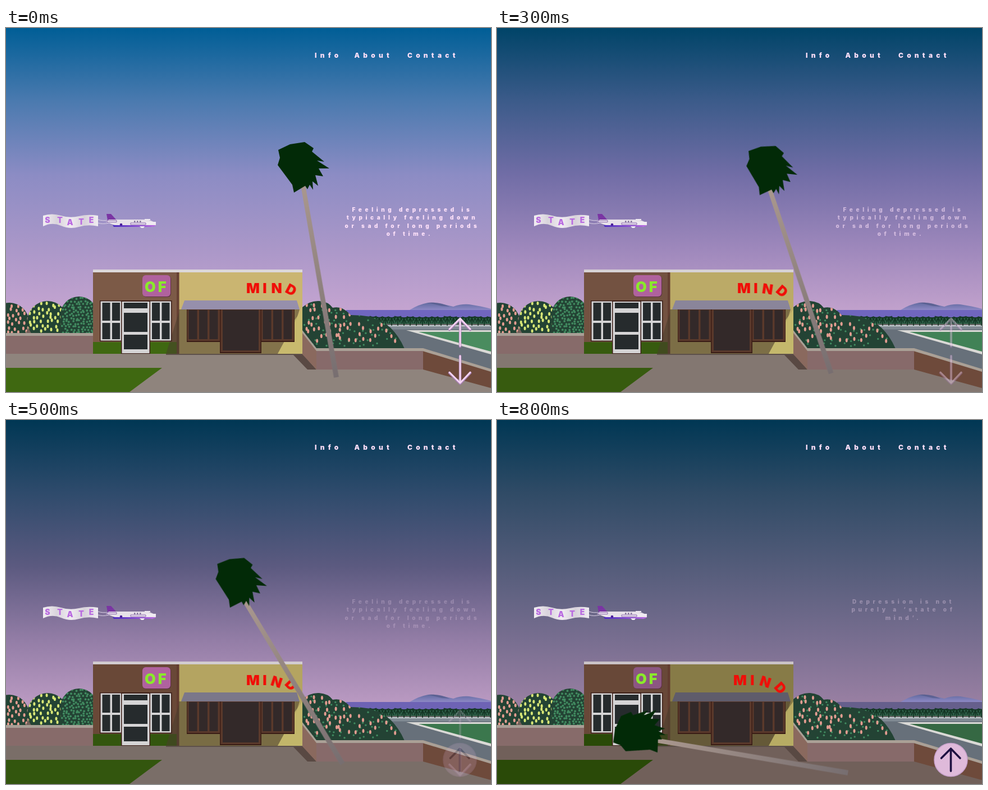
Animation, 864 px wide and 648 px high, one loop 0.9 s. Source, as an HTML page:

```html
<!DOCTYPE html>
<html lang="en">
<head>
<meta charset="utf-8">
<title>State of Mind</title>
<style>
  html, body { margin: 0; width: 100%; height: 100%; overflow: hidden; background: #71605a; }
  svg { display: block; width: 864px; height: 648px; }
  text { font-family: Inter, "Open Sans", sans-serif; font-weight: 900; }
  .nav { font-size: 12px; letter-spacing: 6.2px; fill: #fbdff8; }
  .copy { font-size: 10px; letter-spacing: 5.6px; fill: #fbdff8; text-anchor: middle; }
  .mind { font-size: 25px; fill: #f00e08; text-anchor: middle; }
  .banner { font-size: 14px; fill: #b96be0; text-anchor: middle; }
  .line { fill: none; stroke-linecap: round; stroke-linejoin: round; }
  #notice2, #button { opacity: 0; }
</style>
</head>
<body>
<svg viewBox="0 0 864 648">
  <defs>
    <linearGradient id="skyFill" x1="0" y1="0" x2="0" y2="1">
      <stop class="sky" offset="0"/><stop class="sky" offset=".255"/><stop class="sky" offset=".51"/>
      <stop class="sky" offset=".765"/><stop class="sky" offset=".98"/>
    </linearGradient>
    <linearGradient id="hill" x1="0" y1="0" x2="0" y2="1">
      <stop stop-color="#626b9f"/><stop offset="1" stop-color="#8d88c5"/>
    </linearGradient>
    <linearGradient id="cloth">
      <stop stop-color="#f2eef3"/><stop offset=".25" stop-color="#d9d4dc"/><stop offset=".5" stop-color="#f0ebf1"/>
      <stop offset=".75" stop-color="#d8d2db"/><stop offset="1" stop-color="#f0ecf2"/>
    </linearGradient>
    <linearGradient id="belly"><stop stop-color="#4a2bc0"/><stop offset="1" stop-color="#b96be0"/></linearGradient>
    <linearGradient id="bark" x1="0" y1="0" x2="0" y2="1">
      <stop stop-color="#a9978e"/><stop offset="1" stop-color="#776e70"/>
    </linearGradient>
    <clipPath id="pinkBush"><circle cx="6" cy="524" r="35"/></clipPath>
    <clipPath id="limeBush"><circle cx="74" cy="522" r="36"/></clipPath>
    <clipPath id="greenBush"><circle cx="130" cy="511" r="33"/><path d="M98 511h58v34h-58z"/></clipPath>
    <clipPath id="bigBush"><path d="M528 497Q542 485 558 486 574 487 582 498 600 494 614 511 632 511 650 514 690 525 710 571H553L528 541Z"/></clipPath>
  </defs>

  <rect width="864" height="512" fill="url(#skyFill)"/>

  <!-- coast -->
  <rect id="sea" x="606" y="502" width="258" height="14"/>
  <path d="M719 502Q735 492 752 489 768 488 780 492L797 496Q810 491 825 492 846 495 864 500V502Z" fill="url(#hill)"/>
  <path d="M752 489Q772 487 790 496L776 495Z" fill="#515886" opacity=".6"/>
  <rect x="606" y="528" width="258" height="120" fill="#67707a"/>
  <rect x="640" y="529" width="224" height="2.5" fill="#c5cbcd"/>
  <rect x="640" y="531.5" width="224" height="5" fill="#808a93"/>
  <g id="palmRow"></g>
  <path d="M713 538H864V581Z" fill="#dad9d6"/>
  <path id="field" d="M735 541H864V576Z"/>

  <!-- ground and walls -->
  <path id="ground" d="M0 580H553L743 606 864 640V648H0Z"/>
  <path id="grass" d="M0 605H278L220 648H0Z"/>
  <g clip-path="url(#pinkBush)"><path d="M0 480h50v70H0z" fill="#234334"/><g id="pinkDots"></g></g>
  <g clip-path="url(#limeBush)"><path d="M30 480h90v70H30z" fill="#234334"/><g id="limeDots"></g></g>
  <g clip-path="url(#greenBush)"><path d="M90 470h70v80H90z" fill="#234334"/><g id="greenDots"></g></g>
  <rect y="543" width="156" height="37" fill="#876b6a"/>
  <rect y="543" width="156" height="5" fill="#a99f96"/>
  <g clip-path="url(#bigBush)"><path d="M520 480h200v100H520z" fill="#234334"/><g id="mixedDots"></g></g>
  <path d="M510 580H528L553 608H537Z" fill="#594943"/>
  <path d="M528 540L553 572V608L528 581Z" fill="#8a695e"/>
  <path d="M553 573H743V608H553Z" fill="#876a6a"/>
  <path d="M743 573L864 611V641L743 608Z" fill="#6e4a3b"/>
  <path d="M528 538L553 570H743L864 607V612L742 575H553L528 543Z" fill="#aaa096"/>

  <!-- shop -->
  <path id="brown" d="M155 435H309V580H155Z"/>
  <path d="M304 435h5v145h-5z" fill="#60392e" opacity=".75"/>
  <path id="hedge" d="M155 559h149v21H155z"/>
  <path id="tan" d="M308.500 435H528V580H308.500Z"/>
  <path d="M308 506V501H523L518 517 484 580H285Z" fill="#4a3e2c" opacity=".55"/>
  <path d="M514 520V558H496L484 580H528V501Z" fill="#c7bd6e" opacity=".75"/>
  <path id="roof" d="M155 430H528V435H155Z"/>
  <path d="M285 580H528V582H285Z" fill="#5d504a"/>
  <g id="windows"></g>
  <path id="awning" d="M318 485H518L523 501H312Z"/>
  <rect x="244" y="441" width="50" height="38" rx="6" fill="#5c3144"/>
  <rect id="sign" x="243" y="440" width="50" height="38" rx="6"/>
  <text x="247" y="469.500" font-size="25.500" letter-spacing="4" fill="#8aea2a">OF</text>
  <g class="mind">
    <text class="letter" y="9">M</text><text class="letter" y="9">I</text>
    <text class="letter" y="9">N</text><text class="letter" y="9">D</text>
  </g>

  <!-- plane with banner -->
  <path d="M164 341Q172 344 183 342M164 347Q172 350 183 347" fill="none" stroke="#ddd3e6"/>
  <path d="M66 334Q82 329 98 334T130 335 164 334V353Q146 349 130 354T98 352 66 353Z" fill="url(#cloth)"/>
  <g class="banner">
    <text x="74" y="347">S</text><text x="96" y="347">T</text><text x="114" y="351">A</text>
    <text x="134" y="350">T</text><text x="152" y="347">E</text>
  </g>
  <path d="M179 331H187L197 342H181Z" fill="#7a35a3"/>
  <path d="M178 345L183 341H245Q259 341 267 348V351L260 354H203L191 350Z" fill="#e7e1e9"/>
  <path d="M190 351H267Q265 354 258 354H192Z" fill="url(#belly)"/>
  <path d="M247 340h10v2h-10zM238 353h9l-2 3h-4zM248 345h19v5h-19z" fill="#f0ebf2"/>
  <path d="M180 342.500h17v3h-17zM222 347h27v3h-27z" fill="#eee8f1" stroke="#71499c" stroke-width=".8"/>
  <path d="M228 344.500h14" stroke="#7b6a95" stroke-width="2.500" stroke-dasharray="2.500 2.500"/>
  <circle cx="205" cy="350" r="2.300" fill="#4a209a"/>

  <!-- falling palm -->
  <path id="trunk" d="M-4 -4H4L4.500 342H-4.500Z" fill="url(#bark)"/>
  <path id="crown" fill="#022a07" d="M0 0L-3 -14 -29 -49 -25 -62 -28 -76 -7 -86 19 -90 35 -79 32 -73 54 -55 41 -57 63 -43 44 -43 52 -29 38 -31 43 -12 33 -20 34 -5 28 -14 24 -6 20 -12Z"/>

  <text class="nav" x="550" y="53">Info</text>
  <text class="nav" x="620.500" y="53">About</text>
  <text class="nav" x="715" y="53">Contact</text>
  <g id="notice1" class="copy">
    <text x="724" y="327">Feeling depressed is</text><text x="724" y="341">typically feeling down</text>
    <text x="724" y="355.500">or sad for long periods</text><text x="719.500" y="370">of time.</text>
  </g>
  <g id="notice2" class="copy">
    <text x="724" y="327">Depression is not</text><text x="724" y="341">purely a ‘state of</text>
    <text x="724" y="355.500">mind’.</text>
  </g>
  <g id="arrows" class="line">
    <path d="M790 537L809 518 827 537M809 519V567M790 614L809 633 827 614M809 632V584" stroke="#a77fb4" stroke-width="4.500"/>
    <path d="M790 536L809 517 827 536M809 518V566M790 613L809 632 827 613M809 631V584" stroke="#f5d5f2" stroke-width="2.800"/>
  </g>
  <g id="button">
    <circle cx="808.500" cy="605" r="29.500" fill="#dfbada" stroke="#c9a2cd" stroke-width="1.500"/>
    <path class="line" d="M791.500 602L808.500 585 825 602M808.500 586V625" stroke="#1d1040" stroke-width="3.600"/>
  </g>
</svg>
<script>
const $ = id => document.getElementById(id);

let seed = 7;
const rand = () => (seed = seed * 16807 % 2147483647) / 2147483647;

// Jittered rows of ellipses
function scatter(id, [x0, y0, x1, y1], [dx, dy], [rx, ry], color, keep = 1) {
  let out = '', row = 0;
  for (let y = y0; y < y1; y += dy, row++)
    for (let x = x0 + row % 2 * dx / 2; x < x1; x += dx) {
      const cx = x + (rand() - .5) * dx * .6, cy = y + (rand() - .5) * dy * .7;
      if (rand() < keep) out += `<ellipse cx="${cx}" cy="${cy}" rx="${rx}" ry="${ry}" fill="${color}"/>`;
    }
  $(id).innerHTML += out;
}
const pink = '#e39c90', leaf = '#418a60';
scatter('pinkDots', [1, 494, 40, 543], [11, 8], [2, 3.2], pink);
scatter('limeDots', [42, 492, 108, 543], [10, 7.5], [2, 3.2], '#d7e676');
scatter('greenDots', [101, 482, 158, 543], [6, 5], [1.9, 1.9], leaf);
scatter('mixedDots', [532, 492, 706, 568], [12, 9], [1.7, 1.7], leaf, .7);
scatter('mixedDots', [534, 493, 615, 545], [13, 10], [2, 3.6], pink, .7);
scatter('mixedDots', [545, 528, 695, 562], [14, 9], [2, 3.6], pink, .55);

let palms = '<rect x="606" y="515" width="258" height="12" fill="#2f6049"/>';
for (let x = 610; x < 866; x += 11) {
  const y = 515 + rand() * 2;
  palms += `<path d="M${x} ${y}V530M${x - 7} ${y + 5}Q${x - 4} ${y - 3} ${x} ${y} ${x + 4} ${y - 3} ${x + 7} ${y + 5}` +
    `M${x - 6} ${y - 2}L${x} ${y} ${x + 6} ${y - 2}M${x - 4} ${y + 9}L${x} ${y} ${x + 4} ${y + 9}" fill="none" stroke="#143524" stroke-width="1.7"/>`;
}
$('palmRow').innerHTML = palms;

// Shop front: each box is x, y, width, height
const box = (x, y, w, h, fill) => `<rect x="${x}" y="${y}" width="${w}" height="${h}" fill="${fill}"/>`;
const white = '#d5d4d5', glass = '#262b2d', frame = '#5a392b', edge = '#3a1d16', dark = '#332929';
const sash = x => box(x, 485, 40, 73, edge) + box(x + 1.5, 486.5, 37, 70, white) +
  [4.5, 22].map(dx => box(x + dx, 489, 14, 32, glass) + box(x + dx, 525, 14, 29, glass)).join('');
const shopWindow = x => box(x, 501, 60, 58, edge) + box(x + 1, 501, 58, 56, frame) +
  [3.5, 22, 40.5].map(dx => box(x + dx, 502, 15, 52, dark)).join('');
$('windows').innerHTML = sash(167) + sash(255.5) +
  box(205, 485, 52, 95, edge) + box(206.5, 487, 49, 92, white) +
  box(210, 489, 42, 10, glass) + box(210, 507, 42, 34, glass) + box(210, 546, 42, 26, glass) +
  shopWindow(322) + shopWindow(454) +
  box(381, 501, 74, 78, edge) + box(382.5, 501, 71, 76, frame) + box(386, 502, 64, 72, dark);

// The picture advances in ninths of the loop; longer gaps are filled with even steps.
const ticks = [0, 2, 4, 5, 7, 8, 9];
function track(el, prop, values) {
  const frames = ticks.map((tick, i) => ({
    [prop]: values[Math.min(i, 5)],
    offset: tick === 9 ? 1 : Math.max(0, tick / 9 - 1e-4),
    easing: `steps(${(ticks[i + 1] || 10) - tick})`
  }));
  el.animate(frames, { duration: 900, iterations: Infinity });
}
const tint = (el, prop, colors) => track(el, prop, colors.split(' ').map(c => '#' + c));
const pose = (el, list) => track(el, 'transform',
  list.map(([x, y, turn = 0, stretch = 1]) => `translate(${x}px, ${y}px) rotate(${turn}deg) scale(1, ${stretch})`));

const skyColors = [
  '005e96 00507a 003856 003754 003756 003754',
  '4b7aaf 3e6498 3a527c 2f4b6c 324c6a 304b66',
  '8c8cc4 7a76b2 68649a 5c5a80 5c597e 545c7a',
  'aa97c8 a38dc1 9882b6 937da6 887898 786e90',
  'c4a4d0 c4a2ce bea0ca b999c1 ac96b6 987fa2'
];
document.querySelectorAll('.sky').forEach((stop, i) => tint(stop, 'stopColor', skyColors[i]));

const lawn = '3f6811 3b6010 33560e 33560e 2e4f0c 2a4a08';
const fills = {
  sea: '7066bf 7066bf 7066be 6e63b5 5f5a94 665f8c',
  field: '4a8c5f 438457 3f7f54 3b774d 3a7249 356843',
  ground: '8f847d 8b807a 7a6e68 7a6e68 7d6f68 71605a',
  grass: lawn,
  hedge: lawn,
  brown: '7c5a47 7b5946 6a4b3b 694837 684838 684838',
  tan: 'cab571 c2b06c b4a461 b4a461 a89a5a 877b47',
  roof: 'dcd8da dad5d8 d4ced2 d2ccd0 d2ccd0 cac3c7',
  awning: '968fac 9690aa 7d7989 7b778a 686574 5f5c6b',
  sign: 'b0629e b0629e b0629e b0629e b0629e 8c5682'
};
for (const id in fills) tint($(id), 'fill', fills[id]);

const fades = {
  notice1: [1, .75, .45, .24, .1, 0],
  notice2: [0, 0, 0, 0, 0, .32],
  arrows: [1, .45, .4, .2, .17, 0],
  button: [0, 0, 0, .2, .2, 1]
};
for (const id in fades) track($(id), 'opacity', fades[id]);

pose($('trunk'), [[530, 285, -9.85], [522, 283, -11.7], [452, 298, -25.2], [427, 325, -31, .98], [316, 521, -70, .73], [288, 571, -80.4]]);
pose($('crown'), [[513, 293], [502, 290, 8], [434, 305, 4], [399, 334, 4], [285, 537, -12], [286, 592, -57]]);

const letters = document.querySelectorAll('.letter');
const still = (x, last) => [...Array(5).fill([x, 463]), [last, 463]];
pose(letters[0], still(440, 433));
pose(letters[1], still(461, 455));
pose(letters[2], [[482, 463], [482, 464, 5], [482, 465, 12], [482, 466, 18], [483, 467, 20], [478, 466, 18]]);
pose(letters[3], [[508, 466, 28], [508, 467, 38], [508, 470, 44], [508, 471, 46], [508, 474, 48], [505, 477, 48]]);
</script>
</body>
</html>
```
